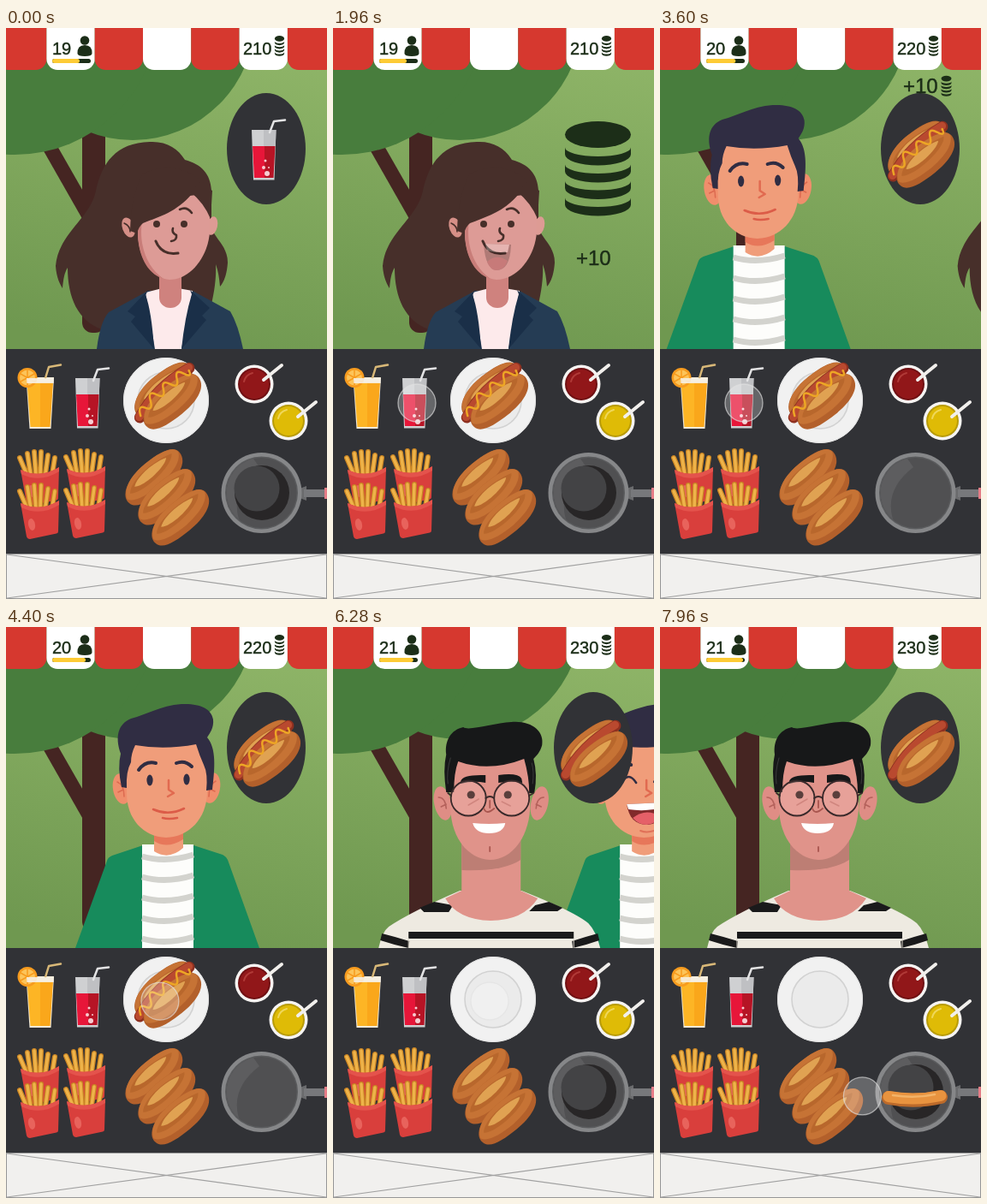
An HTML page for the animation above (8000 ms loop, 375x667 px).

```html
<!DOCTYPE html>
<html lang="en">
<head>
<meta charset="utf-8">
<title>Snack stand</title>
<style>
html,body{margin:0;width:100%;height:100%;overflow:hidden;background:#313236}
svg{display:block;width:100vw;height:100vh}
text{font-family:"Liberation Sans",Arial,sans-serif;fill:#1c2e18;stroke:#1c2e18;stroke-width:.45}
.line{fill:none;stroke-linecap:round;stroke-linejoin:round}
</style>
</head>
<body>
<svg viewBox="0 0 375 667" xmlns="http://www.w3.org/2000/svg">
<defs>
  <linearGradient id="grass" x1=".6" y1="0" x2=".4" y2="1">
    <stop offset="0" stop-color="#8fb568"/><stop offset="1" stop-color="#6f9850"/>
  </linearGradient>
  <clipPath id="scene"><rect width="375" height="375"/></clipPath>
  <g id="coins" fill="#1c2e18">
    <ellipse cy="-40" rx="38.5" ry="15.5"/>
    <path id="coin" d="M-38.5 -25A38.5 10.500 0 0 0 38.5 -25V-17A38.5 13 0 0 1 -38.5 -17Z"/>
    <use href="#coin" y="20"/><use href="#coin" y="39.5"/><use href="#coin" y="59"/>
  </g>
  <g id="bun">
    <path d="M-41 6C-44 -8 -22 -18 2 -18C26 -18 42 -14 42 -3C42 13 20 19 0 19C-22 19 -39 17 -41 6Z" fill="#b3602b"/>
    <path d="M-40 1C-36 -12 -18 -18 2 -18C26 -18 42 -13 41 -4C36 7 18 11 0 12C-18 12 -36 10 -40 1Z" fill="#c67335"/>
    <path d="M-33 -2C-24 -14 12 -15 34 -8C28 4 -22 8 -33 -2Z" fill="#b8672c"/>
    <path d="M-24 -5C-14 -13 14 -13 26 -8C18 0 -16 2 -24 -5Z" fill="#e0a252"/>
  </g>
  <g id="plainDog">
    <g transform="rotate(-38)">
      <use href="#bun" y="-8"/>
      <path class="line" d="M-41 1Q-6 -15 40 -9" stroke="#8e3020" stroke-width="13"/>
      <path class="line" d="M-41 0Q-6 -16 40 -10" stroke="#b9492f" stroke-width="9.500"/>
      <use href="#bun" y="9"/>
    </g>
  </g>
  <g id="sauceDog">
    <use href="#plainDog"/>
    <path class="line" transform="rotate(-38)" d="M-39 0q5 -13 10 -4t10 -3t10 -1t10 0t10 0t10 0t10 0t7 1" stroke="#eda625" stroke-width="2.500"/>
  </g>
  <g id="soda">
    <path d="M81 409H109.500L107.500 467.500H83Z" fill="#cfd0d2"/>
    <path d="M95 409H109.500L108.800 428H95Z" fill="#bfc0c3"/>
    <path d="M82 428H96V465H84Z" fill="#e71639"/>
    <path d="M96 428H108.500L106.500 465H96Z" fill="#b61425"/>
    <path class="line" d="M102 412L107 399L120 397.500" stroke="#e3e3e4" stroke-width="2.500"/>
    <g fill="#f7cdd2"><circle cx="97" cy="445" r="1.500"/><circle cx="95" cy="453" r="2"/><circle cx="99" cy="460" r="3"/><circle cx="101" cy="453" r="1"/></g>
  </g>
  <g id="fries">
    <path id="sticks" class="line" d="M16 541L25 562M25 536L29 562M33 534L35 562M41 534L40 562M49 538L46 560M57 541L54 560" stroke="#c98424" stroke-width="6"/>
    <path class="line" d="M16 541L25 562M25 536L29 562M33 534L35 562M41 534L40 562M49 538L46 560M57 541L54 560" stroke="#eeb349" stroke-width="3.500"/>
    <path d="M17 555Q40 566 62 552L61 588Q61 590 59 590.500L28 597Q25 597 24 594Z" fill="#d93f3c"/>
    <path d="M17 555Q40 566 62 552V557Q40 571 18 560Z" fill="#e4534c"/>
    <ellipse cx="30" cy="580" rx="4" ry="7" transform="rotate(-12 30 580)" fill="#e8635c"/>
  </g>
  <path id="spoon" class="line" d="M11 -5L32 -22" stroke="#f1efec" stroke-width="4"/>
</defs>

<g clip-path="url(#scene)">
  <rect width="375" height="375" fill="url(#grass)"/>
  <path d="M43 142L60 138L92 194V228Z" fill="#452522"/>
  <rect x="89" y="100" width="27" height="256" rx="12" fill="#452522"/>
  <circle cx="148" cy="-12" r="143" fill="#487d3d"/><circle cx="10" cy="-21" r="169" fill="#487d3d"/>

  <g id="woman">
    <path d="M168 133C128 134 112 158 105 190C99 222 61 240 58 278C59 292 63 299 66 304C67 294 68 286 72 280C72 315 84 342 112 352L180 340L238 330C243 312 246 292 245 276C248 284 249 292 250 302C255 296 258 288 259 274C259 254 243 246 240 232V190C239 170 228 159 209 154C201 141 188 132 168 133Z" fill="#472f2a"/>
    <path d="M106 375Q110 343 120 332L166 307H218L262 331Q271 346 277 375Z" fill="#253c54"/>
    <path d="M163 309L190 302L218 307L205 375H174Z" fill="#fdeaeb"/>
    <path d="M166 306L142 331L151 337L146 343L173 375Q170 330 163 312Z" fill="#1a2f48"/>
    <path d="M215 306L238 327L229 336L234 341L205 375Q209 337 217 311Z" fill="#1a2f48"/>
    <path d="M179 280H205V315A13 12 0 0 1 179 315Z" fill="#cf827e"/>
    <ellipse cx="143" cy="233" rx="7" ry="12" transform="rotate(-20 143 233)" fill="#d58f87"/>
    <path class="line" d="M138 228Q145 231 145 238" stroke="#472f2a" stroke-width="1.500"/>
    <ellipse cx="241" cy="231" rx="6" ry="11" transform="rotate(12 241 231)" fill="#dd9b94"/>
    <path d="M154 220Q180 196 238 194V238C236 268 215 294 191 294C169 292 154 268 154 238Z" fill="#dd9b96"/>
    <path d="M154 222L159 224C155 252 163 278 184 293C165 287 154 266 154 238Z" fill="#c97d79"/>
    <path d="M145 237Q146 195 160 170Q205 150 240 190V196Q226 193 217 194C199 215 180 220 160 228Q155 232 153 240Z" fill="#472f2a"/>
    <path d="M216 192Q231 204 239 223L241 190L226 180Z" fill="#472f2a"/>
    <circle cx="176" cy="229" r="4" fill="#472f2a"/><circle cx="208" cy="229" r="4" fill="#472f2a"/>
    <path class="line" d="M203 212Q211 208 217 216M195 234Q193 239 199 242Q200 248 193 249" stroke="#472f2a" stroke-width="2.600"/>
    <path id="womanSmile" class="line" d="M175 249Q182 266 201 263" stroke="#472f2a" stroke-width="3"/>
    <g id="womanOpen">
      <path d="M176 252L208 253Q207 283 191 283Q178 282 176 252Z" fill="#301b1b"/>
      <path d="M178 252L206 253L204 262Q190 263 180 260Z" fill="#fff"/>
      <path d="M180 273Q191 263 204 272Q200 283 191 283Q184 283 180 273Z" fill="#8a1d29"/>
    </g>
  </g>

  <g id="green">
    <path d="M81 375L118 273Q119 269 124 267L160 255H219L253 266Q257 268 259 272L296 375Z" fill="#178b5c"/>
    <path d="M159 254H219V375H159Z" fill="#fdfdfb"/>
    <g id="waves" class="line" stroke="#d3d3ce" stroke-width="7"></g>
    <path d="M173 235H207V258Q190 273 173 262Z" fill="#f09d7a"/>
    <path d="M173 240H207V248Q188 260 173 250Z" fill="#e7775a"/>
    <ellipse cx="135" cy="189" rx="10" ry="18" transform="rotate(-10 135 189)" fill="#f08e6c"/>
    <ellipse cx="240" cy="188" rx="10" ry="18" transform="rotate(10 240 188)" fill="#f08e6c"/>
    <path class="line" d="M130 181Q138 184 138 198M245 180Q237 184 237 198M131 193L137 190M244 192L238 189" stroke="#dd6a50" stroke-width="1.600"/>
    <path d="M141 133H235V194C234 224 214 245 187 246C160 245 141 224 141 194Z" fill="#f09d7a"/>
    <path d="M135 187Q130 164 134 148C127 128 131 113 146 107C165 102 180 92 205 90C226 89 240 95 242 108C243 118 238 124 235 129C246 142 244 165 241 190L234 191Q236 171 231 161Q226 150 222 137Q185 144 151 138Q146 148 146 158Q140 169 141 188Z" fill="#302d43"/>
    <path class="line" d="M190 179V190L196 194L189 198" stroke="#e16a50" stroke-width="2.500"/>
    <g id="greenCalm">
      <path class="line" d="M155 167Q163 156 175 159M199 159Q209 155 217 163" stroke="#302d43" stroke-width="4"/>
      <ellipse cx="168" cy="179" rx="3.600" ry="6.500" fill="#302d43"/><ellipse cx="211" cy="178" rx="3.600" ry="6.500" fill="#302d43"/>
      <path class="line" d="M172 213Q190 221 208 212M183 223Q190 225 200 223" stroke="#dc5c48" stroke-width="2.600"/>
    </g>
    <g id="greenLaugh">
      <path class="line" d="M155 169Q160 160 172 161M202 159Q213 155 219 164" stroke="#302d43" stroke-width="4"/>
      <path class="line" d="M161 182Q169 168 178 182M199 181Q208 165 217 181" stroke="#302d43" stroke-width="2.500"/>
      <path d="M167 207L211 205C211 221 203 231 190 231C177 231 169 222 167 207Z" fill="#812a2b"/>
      <path d="M167 207L211 205L210 211Q189 216 169 213Z" fill="#fff"/>
      <path d="M174 223Q189 211 206 221Q200 231 190 231Q181 231 174 223Z" fill="#e56068"/>
      <path class="line" d="M183 238Q190 241 199 238" stroke="#e07158" stroke-width="2"/>
    </g>
  </g>

  <g id="striped">
    <path d="M55 375Q59 356 67 350Q92 333 150 308H222Q283 332 300 346Q309 355 314 375Z" fill="#eeeae1"/>
    <path d="M103 328L120 321L142 325L137 333H108ZM238 325L254 321L270 328L264 332H231ZM90 356H283V364H90ZM59 358Q75 362 91 367L90 375Q72 371 57 366ZM311 358Q296 362 281 367L282 375Q299 371 313 366Z" fill="#1a1a1b"/>
    <path class="line" d="M90 364V375M283 364V375" stroke="#d9d4ca" stroke-width="1"/>
    <path d="M152 245H221V308L241 317Q224 343 186 343Q147 342 133 317L152 308Z" fill="#e0938a"/>
    <path d="M152 245H221V272Q200 286 152 284Z" fill="#bd7e74"/>
    <ellipse cx="130" cy="206" rx="10" ry="20" transform="rotate(-12 130 206)" fill="#df8d85"/>
    <ellipse cx="243" cy="206" rx="10" ry="20" transform="rotate(12 243 206)" fill="#df8d85"/>
    <path class="line" d="M125 199Q133 199 134 212M248 199Q240 199 239 212M128 210L134 207M245 210L239 207" stroke="#b5625c" stroke-width="1.600"/>
    <path d="M139 150H232V212C230 247 210 272 185 272C160 271 140 247 139 212Z" fill="#e0938a"/>
    <path d="M134 193Q130 166 134 149C132 132 140 120 154 117C160 122 190 112 210 111C234 109 249 122 246 138C244 146 239 151 236 154Q241 172 237 194L231 194Q231 175 225 154Q184 170 148 157Q143 170 143 193Z" fill="#171819"/>
    <path class="line" d="M136 183Q134 170 139 153M235 183Q237 169 234 159" stroke="#444" stroke-width=".8"/>
    <path d="M151 180Q153 172 180 173V182Q165 179 151 183ZM195 173Q218 170 222 177L223 182Q210 179 195 182Z" fill="#171819"/>
    <path class="line" d="M160 208L172 201M199 204L209 209" stroke="#bc6961" stroke-width="1.500"/>
    <g fill="#f4bbb4" fill-opacity=".35" stroke="#39292a" stroke-width="1.800"><circle cx="160" cy="200" r="20.500"/><circle cx="210.500" cy="200" r="20.500"/></g>
    <circle cx="163" cy="196" r="4.600" fill="#5a3f3c"/><circle cx="206" cy="196" r="4.600" fill="#5a3f3c"/>
    <path class="line" d="M180 200Q185 196 190 200M140 197L136 194M231 197L236 194" stroke="#39292a" stroke-width="1.800"/>
    <path class="line" d="M185 203V211M178 212Q181 220 190 212M185 257V262" stroke="#a9564f" stroke-width="1.800"/>
    <path d="M165 229Q184 231 203 229Q201 241 184 241Q168 241 165 229Z" fill="#fff"/>
  </g>

  <g id="bubble">
    <ellipse cx="304" cy="141" rx="46" ry="65" fill="#313236"/>
    <use id="wantSoda" href="#soda" x="206" y="-290"/>
    <use id="wantSauce" href="#sauceDog" x="304" y="147"/>
    <use id="wantPlain" href="#plainDog" x="304" y="147"/>
  </g>
  <g id="reward">
    <text x="284" y="276.500" font-size="24">+10</text>
    <use id="pile" href="#coins"/>
  </g>
</g>

<g id="awning"></g>
<text id="guests" x="54" y="31" font-size="20"></text>
<text id="money" x="277" y="31" font-size="20"></text>
<circle cx="92" cy="14.500" r="5.300" fill="#1c2e18"/>
<path d="M83.500 30Q83 20 92 20Q101 20 100.500 30Q100 33 92 33Q84 33 83.500 30Z" fill="#1c2e18"/>
<use href="#coins" transform="translate(319.500 21) scale(.145 .215)"/>
<rect x="54" y="36" width="45" height="5" rx="2.500" fill="#1c2e18"/>
<rect id="bar" x="54" y="36" height="5" rx="2.500" fill="#fdcb35"/>

<rect y="375" width="375" height="240" fill="#313236"/>
<path d="M23.500 408H56L52.500 468H27.500Z" fill="#f2ead9"/>
<path d="M24.500 414H40V466H28.500Z" fill="#fdb525"/><path d="M40 414H55L51.500 466H40Z" fill="#faa71b"/>
<path class="line" d="M46 409L50 396L64 393.500" stroke="#d8b878" stroke-width="2.500"/>
<circle cx="25" cy="408.500" r="11.500" fill="#f79b1e"/><circle cx="25" cy="408.500" r="9" fill="#fcc45a"/>
<path class="line" d="M25 400V417M17 404L33 413M17 413L33 404" stroke="#f79b1e" stroke-width="1.500"/>
<path d="M24 409H56L55.700 415H24.300Z" fill="#f6efe2" fill-opacity=".9"/>
<use href="#soda"/>
<circle cx="187" cy="435" r="50" fill="#f1f1f1"/><circle cx="187" cy="435" r="49.500" fill="none" stroke="#e2e2e2"/>
<circle cx="187" cy="435" r="33" fill="#ebebeb" stroke="#d2d2d2" stroke-width="1.600"/>
<use id="served" href="#sauceDog" x="188" y="429"/>
<g transform="translate(290 416)"><circle r="22.500" fill="#f6f4f2"/><circle r="19" fill="#701013"/><circle r="17" fill="#911719"/><path class="line" d="M-12 -3Q-10 -11 -2 -13" stroke="#b03a37" stroke-width="2"/><use href="#spoon"/></g>
<g transform="translate(330 459)"><circle r="22.500" fill="#f6f4f2"/><circle r="19" fill="#b89b08"/><circle r="17" fill="#dfbb06"/><path class="line" d="M-12 -3Q-10 -11 -2 -13" stroke="#efd75a" stroke-width="2"/><use href="#spoon"/></g>
<use href="#fries" y="-39"/><use href="#fries" x="54" y="-40"/><use href="#fries"/><use href="#fries" x="54" y="-1"/>
<g id="buns"></g>
<path d="M343 538L351 535V552L343 549Z" fill="#6a6b6d"/><rect x="348" y="539" width="27" height="9" fill="#77787b"/><rect x="372" y="537" width="3" height="13" fill="#e57c86"/>
<circle cx="298.500" cy="543" r="47" fill="#868789"/><circle cx="298.500" cy="543" r="42.500" fill="#5a5b5d"/><circle cx="298.500" cy="543" r="41" fill="#505052"/>
<path d="M289 503A41 41 0 0 0 272 574Q262 539 296 513Z" fill="#5d5d5f"/>
<g id="panDark"><circle cx="299" cy="543" r="32" fill="#282627"/><circle cx="293" cy="538" r="26.500" fill="#434345"/></g>
<g id="sausage"><path class="line" d="M267 550Q298 556 328 549" stroke="#bc6a2a" stroke-width="16"/><path class="line" d="M267 548.500Q298 554 328 547.500" stroke="#e8933f" stroke-width="13"/><path class="line" d="M272 547Q298 551 321 546" stroke="#f3b368" stroke-width="2.500"/></g>
<circle id="touch" r="22" fill="#fff" stroke="#e2e2e2" stroke-opacity=".65" stroke-width="1.300"/>
<rect x=".5" y="614.500" width="374" height="52" fill="#f1f0ee" stroke="#969696"/>
<path d="M1 615L374 666M374 615L1 666" stroke="#a1a1a1" stroke-width="1.200"/>
</svg>
<script>
const $ = id => document.getElementById(id);
const part = (t, a, b) => Math.min(1, Math.max(0, (t - a) / (b - a)));
const mix = (a, b, k) => a + (b - a) * k;
const cubic = p => p < .5 ? 4 * p ** 3 : 1 - 4 * (1 - p) ** 3;
const glide = (t, a, b) => cubic(part(t, a, b));
const alpha = (id, v) => $(id).setAttribute('opacity', v);
const show = (id, on) => $(id).setAttribute('display', on ? 'inline' : 'none');
const shift = (id, x, y = 0) => $(id).setAttribute('transform', `translate(${x} ${y})`);

$('awning').innerHTML = Array.from({length: 7}, (_, i) =>
  `<rect x="${-8.9 + 56.3 * i}" y="-20" width="56.300" height="69" rx="13" fill="${i % 2 ? '#fff' : '#d6382f'}"/>`).join('');
$('waves').innerHTML = Array.from({length: 5}, (_, i) =>
  `<path stroke-linecap="butt" d="M159 ${268 + 24 * i}q28 8 60 -2"/>`).join('');
$('buns').innerHTML = [[172, 524.5], [187, 547.5], [203, 571.5]].map(([x, y]) =>
  `<use href="#bun" transform="translate(${x} ${y}) rotate(-39)"/>`).join('');

const SERVE = [1800, 4760], WALK = 363;

function touchAt(t) {
  if (t < 1280) {
    const k = glide(t, 600, 1280), j = 1 - k;
    const bez = (a, b, c, d) => a * j ** 3 + 3 * b * j * j * k + 3 * c * j * k * k + d * k ** 3;
    return [bez(398, 290, -25, 98), bez(548, 548, 500, 438)];
  }
  let k = glide(t, 3800, 4560), x = mix(98, 183, k), y = mix(438, 437, k);
  k = glide(t, 6540, 7240);
  x = mix(x, 310, k); y = mix(y, 555, k);
  k = ((Math.max(t, 7720) - 7720) / 240) ** 2;
  return [x - 73 * k, y - 7 * k];
}

function draw(t) {
  const round = t < SERVE[1] ? 0 : 1;
  const r = t - SERVE[round];

  // customers
  const swap = glide(t, 3040, 3930);
  const leave = glide(t, 5880, 6690), arrive = glide(t, 5620, 6360);
  shift('woman', WALK * swap);
  shift('green', WALK * (swap - 1) + WALK * leave);
  shift('striped', WALK * (arrive - 1));
  show('woman', swap < 1);
  show('green', swap > 0 && leave < 1);
  show('striped', arrive > 0);
  const open = part(t, 1880, 2200);
  alpha('womanOpen', open);
  alpha('womanSmile', 1 - part(t, 1980, 2200));
  const laugh = part(t, 4840, 5160);
  alpha('greenLaugh', laugh);
  alpha('greenCalm', 1 - laugh);

  // order bubble
  const gone = part(r, 0, 120);
  const next = round ? part(t, 5960, 6160) : part(t, 3240, 3440);
  alpha('bubble', r < 0 ? 1 : Math.max(1 - gone, next));
  show('wantSoda', t < 3000);
  show('wantSauce', t >= 3000 && t < 5800);
  show('wantPlain', t >= 5800);

  // payment
  const up = round ? [5480, 6240] : [3040, 3856];
  const pay = glide(r, 200, 880);
  const fade = part(t, up[1] - 210, up[1]);
  shift('reward', 0, -228 * glide(t, ...up));
  alpha('reward', part(r, 0, 120) * (1 - fade));
  $('pile').setAttribute('transform',
    `translate(${mix(309.5, 334.5, pay)} ${mix(164.5, 268, pay)}) scale(${mix(1, .155, pay)} ${mix(1, .218, pay)})`);
  alpha('pile', 1 - .55 * Math.sin(Math.PI * pay ** 3));

  // counters
  const sold = (t >= 3320) + (t >= 6080);
  $('guests').textContent = 19 + sold;
  $('money').textContent = 210 + 10 * sold;
  $('bar').setAttribute('width', 32 + 7 * part(t, 3320, 4200) + 4 * part(t, 6080, 7200));

  // kitchen
  show('served', t < 4760);
  show('panDark', t < 3400 || t >= 4800);
  show('sausage', t >= 7400);
  show('touch', t >= 600);
  shift('touch', ...touchAt(t));
  $('touch').setAttribute('fill-opacity', t < 1640 ? .2 : .25);
}

function tick() {
  draw(performance.now() % 8000);
  requestAnimationFrame(tick);
}
tick();
</script>
</body>
</html>
```
